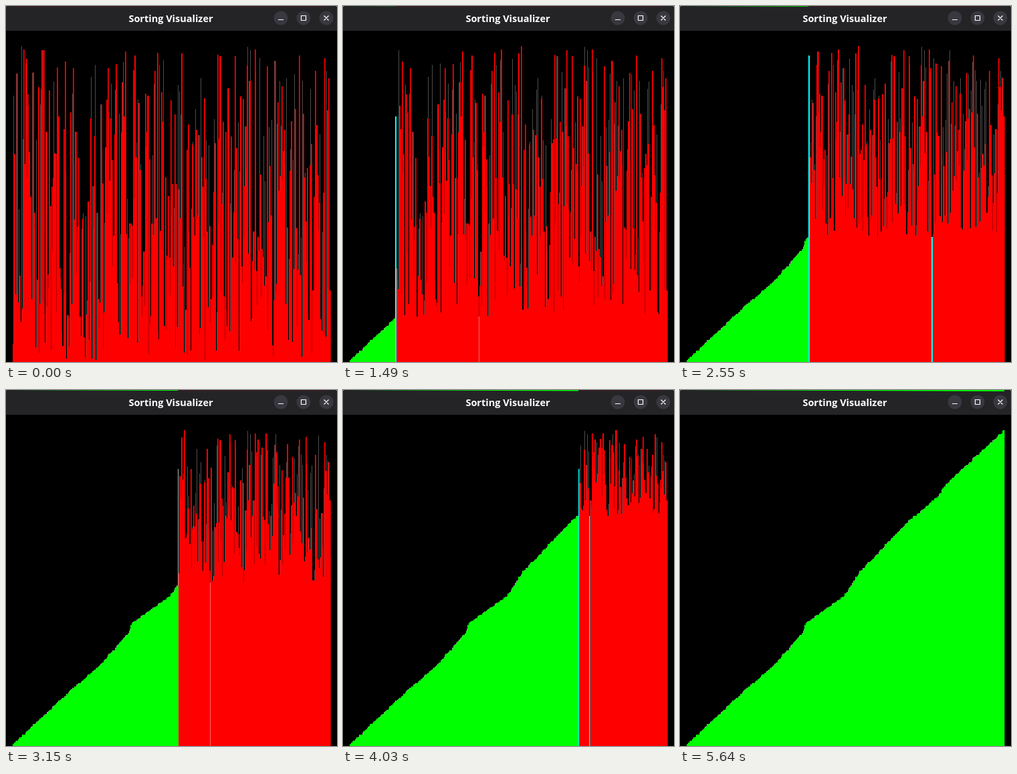
These frames come from a looping animation (495 by 532 pixels, 7290 ms). An HTML page with a canvas:

```html
<!DOCTYPE html>
<html lang="en">
<head>
<meta charset="utf-8">
<title>Sorting Visualizer</title>
<style>
  html, body { margin: 0; width: 100%; height: 100%; overflow: hidden; background: #000; }
  canvas, svg { position: absolute; left: 0; top: 0; }
  text { font: 700 14.5px "Open Sans", "Noto Sans", sans-serif; fill: #fff; }
</style>
</head>
<body>
<canvas width="495" height="532"></canvas>
<svg width="495" height="532" fill="none" stroke="#fff" stroke-width="1.2">
  <text x="246.5" y="24" text-anchor="middle" stroke="none">Sorting Visualizer</text>
  <g fill="#393840" stroke="none">
    <circle cx="411" cy="18" r="10.5"/><circle cx="445" cy="18" r="10.5"/><circle cx="479" cy="18" r="10.5"/>
  </g>
  <path d="M407 20.5h8M441.5 14.5h7v7h-7zM475.5 14.5l7 7M482.5 14.5l-7 7"/>
</svg>
<script>
const W = 495, H = 532, LOOP = 7290, COUNT = 400, LEFT = 9.5, PITCH = 1.1875;
const ctx = document.querySelector('canvas').getContext('2d', { willReadFrequently: true });

let seed = 11;
const rand = () => (seed = seed * 16807 % 2147483647) / 2147483647;
const clamp = (v, lo, hi) => Math.max(lo, Math.min(hi, v));
const barX = i => Math.round(LEFT + PITCH * i);

// Key points of the sorted slope
const slope = [[9, 531], [78, 465], [142, 409], [184, 361], [187, 349], [245, 307],
  [268, 272], [340, 197], [386, 158], [396, 142], [484, 60]];

function slopeAt(x) {
  const k = slope.findIndex(p => p[0] >= x);
  const [x0, y0] = slope[k - 1], [x1, y1] = slope[k];
  return y0 + (y1 - y0) * (x - x0) / (x1 - x0);
}

const tops = Array.from({ length: COUNT }, (_, i) =>
  Math.round(clamp(slopeAt(LEFT + PITCH * i) + rand() * 4 - 2, 60, 531))
).sort((a, b) => b - a);

// The unsorted bars, each held as its rank
const start = tops.map((_, i) => i);
for (let i = COUNT - 1; i > 0; i--) {
  const j = Math.floor(rand() * (i + 1));
  [start[i], start[j]] = [start[j], start[i]];
}

// Screen updates come in runs of 21 with a short rest between
function sortedAt(t) {
  const run = Math.floor((t - 800) / 735);
  const step = 21 * run + Math.min(20, Math.floor((t - 800 - 735 * run) / 34.3));
  return clamp(Math.round(3.19 * step - 5.8), 0, COUNT);
}

function rect(color, x, y, w, h) {
  ctx.fillStyle = color;
  ctx.fillRect(x, y, w, h);
}

// Each pixel pair shares the colour of its left pixel and keeps its own brightness
function shareColour() {
  const img = ctx.getImageData(0, 0, W, H), d = img.data;
  const luma = p => 0.299 * d[p] + 0.587 * d[p + 1] + 0.114 * d[p + 2];
  for (let y = 0; y < H; y++) {
    for (let x = 1; x < W; x += 2) {
      const p = 4 * (y * W + x), shift = luma(p) - luma(p - 4);
      for (let c = 0; c < 3; c++) d[p + c] = d[p - 4 + c] + shift;
    }
  }
  ctx.putImageData(img, 0, 0);
}

function draw(t) {
  const done = sortedAt(t);
  const bars = start.slice();
  for (let i = 0; i < done; i++) {
    const least = bars.indexOf(i);
    bars[least] = bars[i];
    bars[i] = i;
  }

  rect('#000', 0, 0, W, H);
  bars.forEach((rank, i) => {
    const marked = done > 0 && (i === done || rank === done);
    const x = barX(i);
    rect(marked ? '#0ff' : i < done ? '#0f0' : '#f00', x, tops[rank], barX(i + 1) - x, H - tops[rank]);
  });
  shareColour();

  // Title bar with the thin strip along its upper edge
  rect('#242427', 0, 0, W, 37);
  const edge = barX(done);
  rect('#4a1a22', edge, 0, 484 - edge, 1);
  ctx.fillStyle = '#0f0';
  ctx.beginPath();
  ctx.moveTo(9, 0);
  ctx.lineTo(edge, 0);
  ctx.lineTo(edge, edge / 242);
  ctx.fill();
  rect('#aaa', 0, 0, 1, 1);
  rect('#aaa', W - 1, 0, 1, 1);
}

const began = performance.now();
function tick() {
  draw((performance.now() - began) % LOOP);
  requestAnimationFrame(tick);
}
tick();
</script>
</body>
</html>
```
